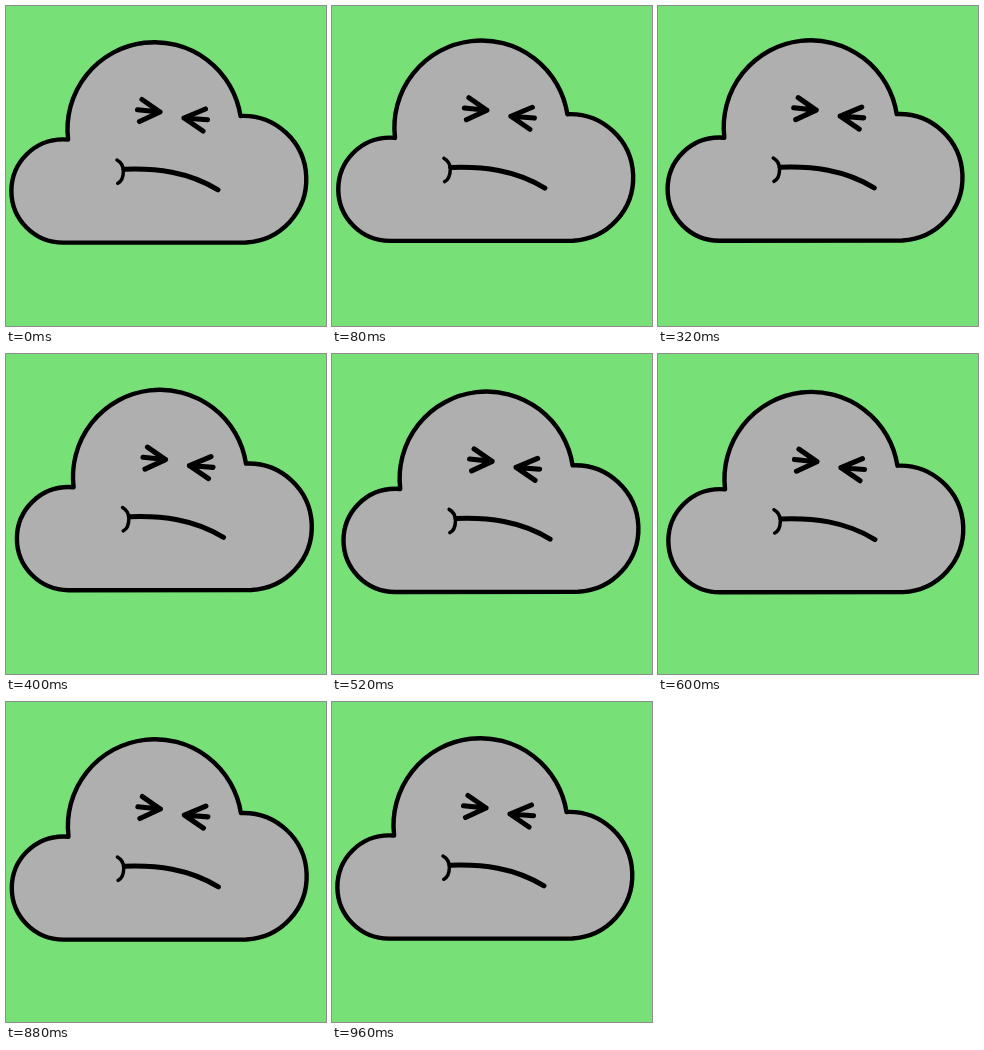
Animation of 320 by 320 pixels, one loop 1000 ms. Source, as an HTML page with a canvas:

```html
<!DOCTYPE html>
<html>
<head>
<meta charset="utf-8">
<title>Grumpy cloud</title>
<style>
html, body { margin: 0; width: 100%; height: 100%; overflow: hidden; background: #77e077; }
canvas { display: block; width: 100vw; height: 100vh; }
</style>
</head>
<body>
<canvas id="stage" width="320" height="320"></canvas>
<script>
const ctx = document.getElementById('stage').getContext('2d');
const LOOP = 1000, STEP = 40, LAP = LOOP - STEP;

// closed drift path, evenly spaced in time over one lap
const driftX = [0, 2.2, 4.2, 6.3, 4.3, 1.4];
const driftY = [0, -3.1, -1.9, 1, 1.8, 1.7];

const cloud = new Path2D();
arcTo(57, 185, 51.6, 57, 236.4, 62.1, 133.4);
arcTo(148.5, 123.2, 87, 62.1, 133.4, 234.5, 110);
arcTo(237, 173.2, 63.3, 234.5, 110, 240, 236.4);
cloud.closePath();

const eyes = new Path2D(
  'M136 93.5 L154 106 L133.5 115.5 M131.5 103.7 L154 106 ' +
  'M199.5 103 L178 112 L197 125 M201.5 113.8 L178 112');
const mouth = new Path2D('M118 163.2 C150 162 182 165.5 212 183.8');
const cheek = new Path2D('M111 154 Q117.2 157.5 117.4 165 Q117.2 175 111.7 177.3');

// clockwise lobe round (cx, cy) between two points
function arcTo(cx, cy, r, x0, y0, x1, y1) {
  cloud.arc(cx, cy, r, Math.atan2(y0 - cy, x0 - cx), Math.atan2(y1 - cy, x1 - cx));
}

// periodic Catmull-Rom curve, p in 0..1
function curve(pts, p) {
  const n = pts.length, i = Math.floor(p * n), u = p * n - i;
  const [a, b, c, d] = [-1, 0, 1, 2].map(k => pts[(i + k + n) % n]);
  return b + u / 2 * (c - a + u * (2 * a - 5 * b + 4 * c - d + u * (3 * (b - c) + d - a)));
}

function line(path, width) {
  ctx.lineWidth = width;
  ctx.stroke(path);
}

function draw(ms) {
  const p = Math.floor((ms % LOOP) / STEP) * STEP / LAP;
  ctx.fillStyle = '#77e077';
  ctx.fillRect(0, 0, 320, 320);
  ctx.save();
  ctx.translate(curve(driftX, p), curve(driftY, p));
  ctx.lineCap = ctx.lineJoin = 'round';
  ctx.strokeStyle = '#000';
  ctx.fillStyle = '#afafaf';
  ctx.fill(cloud);
  line(cloud, 4.4);
  line(eyes, 5.1);
  line(mouth, 5);
  line(cheek, 3.5);
  ctx.restore();
}

const start = performance.now();
function tick() {
  draw(performance.now() - start);
  requestAnimationFrame(tick);
}
tick();
</script>
</body>
</html>
```
